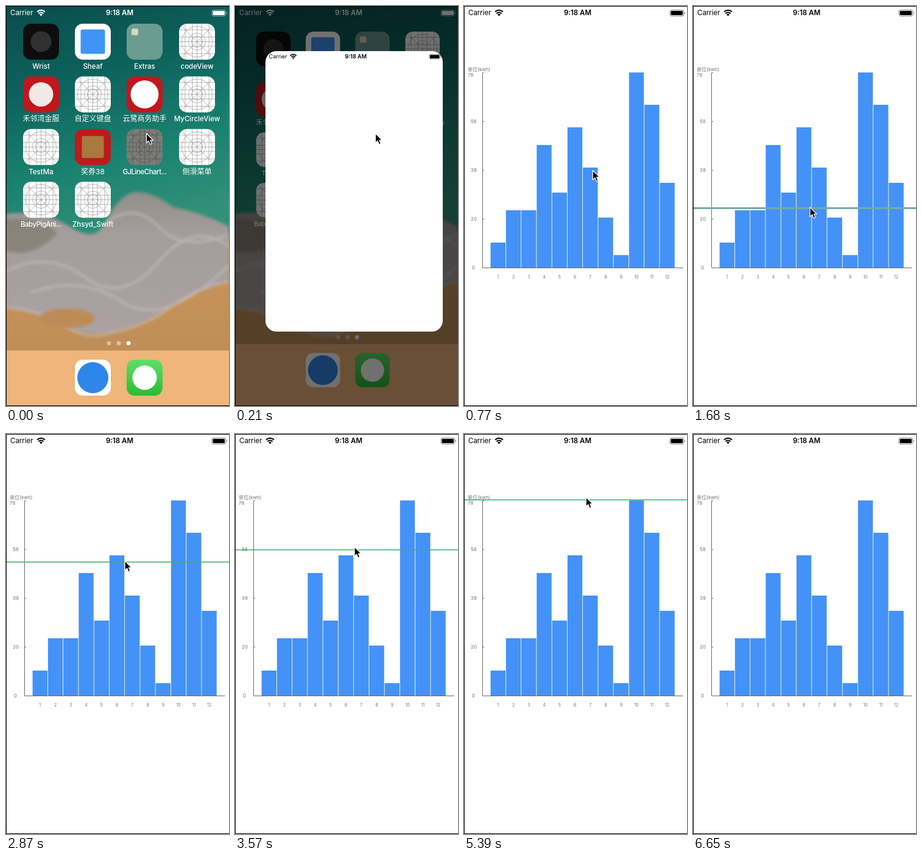
An HTML page for the animation above (7280 ms loop, 366 px wide and 656 px high).

```html
<!DOCTYPE html>
<html lang="zh">
<head>
<meta charset="utf-8">
<title>Bar chart app</title>
<style>
  html, body { margin: 0; width: 100%; height: 100%; overflow: hidden; background: #000; }
  svg { display: block; width: 100vw; height: 100vh; }
  text { font-family: Inter, "Noto Sans CJK SC", "Noto Sans CJK", sans-serif; }
  .label { font-size: 11.5px; fill: #fff; text-anchor: middle; font-weight: 500; }
  .cjk { font-size: 12px; font-weight: 400; }
  .cut { letter-spacing: -.5px; }
  .bar { fill: #4492f7; }
  .chart text { font-size: 8px; fill: #757575; }
  .chart .month { font-size: 7px; text-anchor: middle; }
</style>
</head>
<body>
<svg viewBox="0 0 366 656" preserveAspectRatio="none">
  <defs>
    <linearGradient id="sea" x2=".25" y2="1">
      <stop stop-color="#0a4c4b"/><stop offset=".35" stop-color="#0d625d"/>
      <stop offset=".7" stop-color="#1a8270"/><stop offset="1" stop-color="#329078"/>
    </linearGradient>
    <linearGradient id="foam" x2="0" y2="1">
      <stop stop-color="#8f8f87"/><stop offset=".3" stop-color="#a49d9c"/><stop offset="1" stop-color="#aaa2a2"/>
    </linearGradient>
    <linearGradient id="sand" x2="0" y2="1">
      <stop stop-color="#cb9559"/><stop offset="1" stop-color="#b98a57"/>
    </linearGradient>
    <linearGradient id="green" x2="0" y2="1">
      <stop stop-color="#5fdf66"/><stop offset="1" stop-color="#27bd33"/>
    </linearGradient>
    <filter id="soft"><feGaussianBlur stdDeviation="2.5"/></filter>
    <clipPath id="windowClip"><rect id="clipRect"/></clipPath>
    <g id="grid" fill="none" stroke="#8a8a8a" stroke-width=".6">
      <path d="M0 0L59 59M59 0L0 59M0 10H59M0 22H59M0 29.5H59M0 37H59M0 49H59M10 0V59M22 0V59M29.5 0V59M37 0V59M49 0V59"/>
      <circle cx="29.5" cy="29.5" r="25"/><circle cx="29.5" cy="29.5" r="14"/><circle cx="29.5" cy="29.5" r="9"/>
    </g>
    <g id="status">
      <text x="7" y="15.3" font-size="11.5">Carrier</text>
      <text x="186.5" y="15.3" font-size="11.5" font-weight="600" text-anchor="middle">9:18 AM</text>
      <g fill="none" stroke="currentColor" stroke-width="2">
        <path d="M51 9.6Q57.5 4 64 9.6M53.3 12.2Q57.5 8.7 61.7 12.2"/>
      </g>
      <path d="M55 13.8Q57.5 11.8 60 13.8L57.5 16.5Z"/>
      <rect x="338" y="6.5" width="22.5" height="10" rx="2.5" fill="none" stroke="currentColor" stroke-opacity=".5"/>
      <rect x="339.5" y="8" width="19.5" height="7" rx="1.2"/>
      <path d="M361.8 9.5Q364 11.5 361.8 13.5Z" opacity=".6"/>
    </g>
  </defs>

  <g id="wallpaper">
    <rect width="366" height="400" fill="url(#sea)"/>
    <rect y="380" width="366" height="276" fill="url(#sand)"/>
    <path d="M0 341Q60 332 105 362T165 350Q190 305 215 305T275 330Q320 338 366 362V452Q310 466 270 494T170 536Q125 542 95 524T0 494Z" fill="url(#foam)" filter="url(#soft)"/>
    <path d="M0 350Q55 345 85 372Q45 415 0 402Z" fill="#80796d" opacity=".7" filter="url(#soft)"/>
    <path d="M0 494Q55 498 95 524T170 536Q225 528 270 494T366 452M0 435Q70 400 130 445T250 420T366 395M40 470Q120 440 190 485T366 425M165 355Q210 320 250 362T366 375" fill="none" stroke="#d0cacd" stroke-width="3" opacity=".6" filter="url(#soft)"/>
    <ellipse cx="100" cy="512" rx="46" ry="16" fill="#bd8b57" filter="url(#soft)"/>
  </g>
  <g id="home">
    <rect x="-20" y="565" width="406" height="150" fill="#efb57b"/>
    <g fill="#fff"><circle cx="169" cy="553" r="3.5" opacity=".45"/><circle cx="185" cy="553" r="3.5" opacity=".45"/><circle cx="201" cy="553" r="3.5"/></g>
  </g>
  <use href="#status" fill="#fff" color="#fff"/>
  <rect id="dim" width="366" height="656"/>

  <g id="window" clip-path="url(#windowClip)">
    <rect width="366" height="700" fill="#fff"/>
    <use href="#status" fill="#000" color="#000"/>
    <g id="chart" class="chart">
      <path d="M33 109.5H30.5V429.5H359.5M30 189.5h3M30 269.5h3M30 349.5h3" fill="none" stroke="#6c6c6c"/>
      <text x="6" y="107">单位(kwh)</text>
    </g>
  </g>
  <path id="marker" d="M0 0H366" fill="none"/>
  <path d="M366 .5H.5V655.5H366" fill="none" stroke="#000"/>
  <path id="cursor" d="M0 0V15.5L3.6 12.2L6 18L8.8 16.8L6.4 11.2H11Z" stroke="#fff" stroke-width="1.2" stroke-linejoin="round"/>
</svg>
<script>
const LOOP = 7280, STEP = 70;
const $ = id => document.getElementById(id);

function add(parent, tag, attrs, text = '') {
  const el = document.createElementNS('http://www.w3.org/2000/svg', tag);
  set(el, attrs);
  el.textContent = text;
  return parent.appendChild(el);
}
function set(el, attrs) {
  for (const key in attrs) el.setAttribute(key, attrs[key]);
}
const clamp = v => Math.max(0, Math.min(1, v));

// Linear interpolation in rows of [time, ...values].
function sample(rows, t) {
  const i = rows.findIndex(row => row[0] > t);
  if (i < 0) return rows.at(-1).slice(1);
  if (i === 0) return rows[0].slice(1);
  const a = rows[i - 1], b = rows[i], k = (t - a[0]) / (b[0] - a[0]);
  return a.slice(1).map((v, n) => v + (b[n + 1] - v) * k);
}

// Home screen icons: [label, tile fill, emblem shape, emblem fill, emblem size]
const blank = label => [label, '#fff', 'grid'];
const icons = [
  ['Wrist', '#0d0d0d', 'circle', '#303030', 34], ['Sheaf', '#fff', 'square', '#3f94f5', 40],
  ['Extras', '#6b9c92', 'corner'], blank('codeView'),
  ['禾邻湾金服', '#c3161c', 'circle', '#f1e9e6', 40], blank('自定义键盘'),
  ['云鹭商务助手', '#c3161c', 'circle', '#fff', 46], blank('MyCircleView'),
  blank('TestMa'), ['奖券38', '#bd1a1c', 'square', '#a9793f', 36],
  ['GJLineChart...', '#7b7b79', 'pressed'], blank('侧滑菜单'),
  blank('BabyPigAni...'), blank('Zhsyd_Swift')
];
const columns = [28, 113, 198, 284];

function drawIcon(x, y, [label, fill, shape, color, size]) {
  const g = add($('home'), 'g', { transform: `translate(${x} ${y})` });
  add(g, 'rect', { width: 59, height: 59, rx: 13, fill });
  if (shape === 'circle') add(g, 'circle', { cx: 29.5, cy: 29.5, r: size / 2, fill: color });
  if (shape === 'square') add(g, 'rect', { x: 29.5 - size / 2, y: 29.5 - size / 2, width: size, height: size, rx: 3, fill: color });
  if (shape === 'corner') add(g, 'rect', { x: 8, y: 8, width: 11, height: 11, rx: 3, fill: '#ddd2c6' });
  if (shape === 'grid' || shape === 'pressed') {
    const grid = add(g, 'use', { href: '#grid', style: 'clip-path: inset(0 round 13px)' });
    if (shape === 'pressed') grid.setAttribute('style', 'clip-path: inset(0 round 13px); filter: brightness(.55)');
  }
  const kind = /[^\x00-\x7f]/.test(label) ? 'cjk' : label.endsWith('...') ? 'cut' : '';
  add(g, 'text', { x: 29.5, y: 74, class: 'label ' + kind }, label);
}
icons.forEach((icon, i) => drawIcon(columns[i % 4], 29 + 86.4 * Math.floor(i / 4), icon));
drawIcon(113, 580, ['', '#fff', 'circle', '#2f86ea', 51]);
drawIcon(198, 580, ['', 'url(#green)', 'circle', '#fff', 40]);

// Chart
const BASE = 429;
const tops = [388, 335, 335, 228, 306, 199, 265, 347, 408.5, 109, 162, 290];
[[78, 6, 116], [58, 11, 192], [39, 11, 272], [20, 11, 352], [0, 13, 432]]
  .forEach(([value, x, y]) => add($('chart'), 'text', { x, y }, value));
const bars = tops.map((top, i) => {
  const x = 43.6 + 25.25 * i, mid = x + 12.2;
  add($('chart'), 'path', { d: `M${mid} 429v-2`, stroke: '#6c6c6c' });
  add($('chart'), 'text', { x: mid, y: 446.5, class: 'month' }, i + 1);
  return add($('chart'), 'rect', { x, width: 24.4, class: 'bar' });
});

// time, x, y, width, height, radius, dim
const launch = [
  [0, 198, 202, 59, 59, 13, 0],
  [70, 180, 188, 92, 105, 14, .1],
  [140, 112, 126, 195, 278, 17, .36],
  [210, 50, 74, 291, 460, 18, .56],
  [280, 22, 32, 334, 572, 14, .66],
  [350, 9, 13, 355, 625, 8, .72],
  [420, 4, 5, 362, 644, 2, .77],
  [490, 1, 2, 365, 653, 0, .8],
  [560, 0, 0, 366, 656, 0, .8]
];
const grown = [[280, 0], [420, 8.86], [770, 12]];
const chartFade = [[210, 0], [280, .4], [420, .76], [770, 1]];
const pointer = [
  [490, 230.5, 209], [1050, 192, 330], [1960, 192, 330], [2730, 195, 209],
  [2870, 195, 208], [3150, 195, 203], [3220, 195, 203], [3570, 196, 185],
  [3780, 196, 185], [4340, 199, 121], [4480, 199, 115], [4550, 199, 115],
  [5320, 200, 107], [5600, 201, 93], [5950, 201, 93], [6650, 205, 670]
];

function drawMarker(t) {
  const y = sample(pointer, t - STEP)[1];
  const speed = Math.abs(y - sample(pointer, t - 2 * STEP)[1]);
  const held = t < 2030, fast = speed > 4;
  set($('marker'), {
    visibility: t >= 1680 && t < 6020 ? 'visible' : 'hidden',
    transform: `translate(0 ${Math.round(y) + (held ? 1.5 : fast ? .5 : 1)})`,
    stroke: held ? '#75aaa8' : fast ? '#c3cac6' : '#3bb065',
    'stroke-width': held ? 3 : fast ? 1 : 1.6,
    'stroke-dasharray': fast && !held ? '2 1' : 'none'
  });
}

function render(t) {
  const [x, y, width, height, rx, dim] = sample(launch, t);
  const scale = width / 366;
  set($('window'), { transform: `translate(${x} ${y}) scale(${scale})`, opacity: clamp(t / 140) });
  set($('clipRect'), { width: 366, height: height / scale, rx: rx / scale });
  set($('dim'), { opacity: dim });
  const zoom = 1 - .058 * clamp((width - 59) / 307);
  set($('home'), { transform: `translate(183 328) scale(${zoom}) translate(-183 -328)` });

  set($('chart'), { opacity: sample(chartFade, t)[0] });
  const count = sample(grown, t)[0];
  bars.forEach((bar, i) => {
    const h = (BASE - tops[i]) * clamp(count - i);
    set(bar, { y: BASE - h, height: h });
  });

  drawMarker(t);
  set($('cursor'), { transform: `translate(${sample(pointer, t).join(' ')})` });
}

const start = performance.now();
function tick() {
  const t = (performance.now() - start) % LOOP;
  render(Math.floor(t / STEP) * STEP);
  requestAnimationFrame(tick);
}
tick();
</script>
</body>
</html>
```
